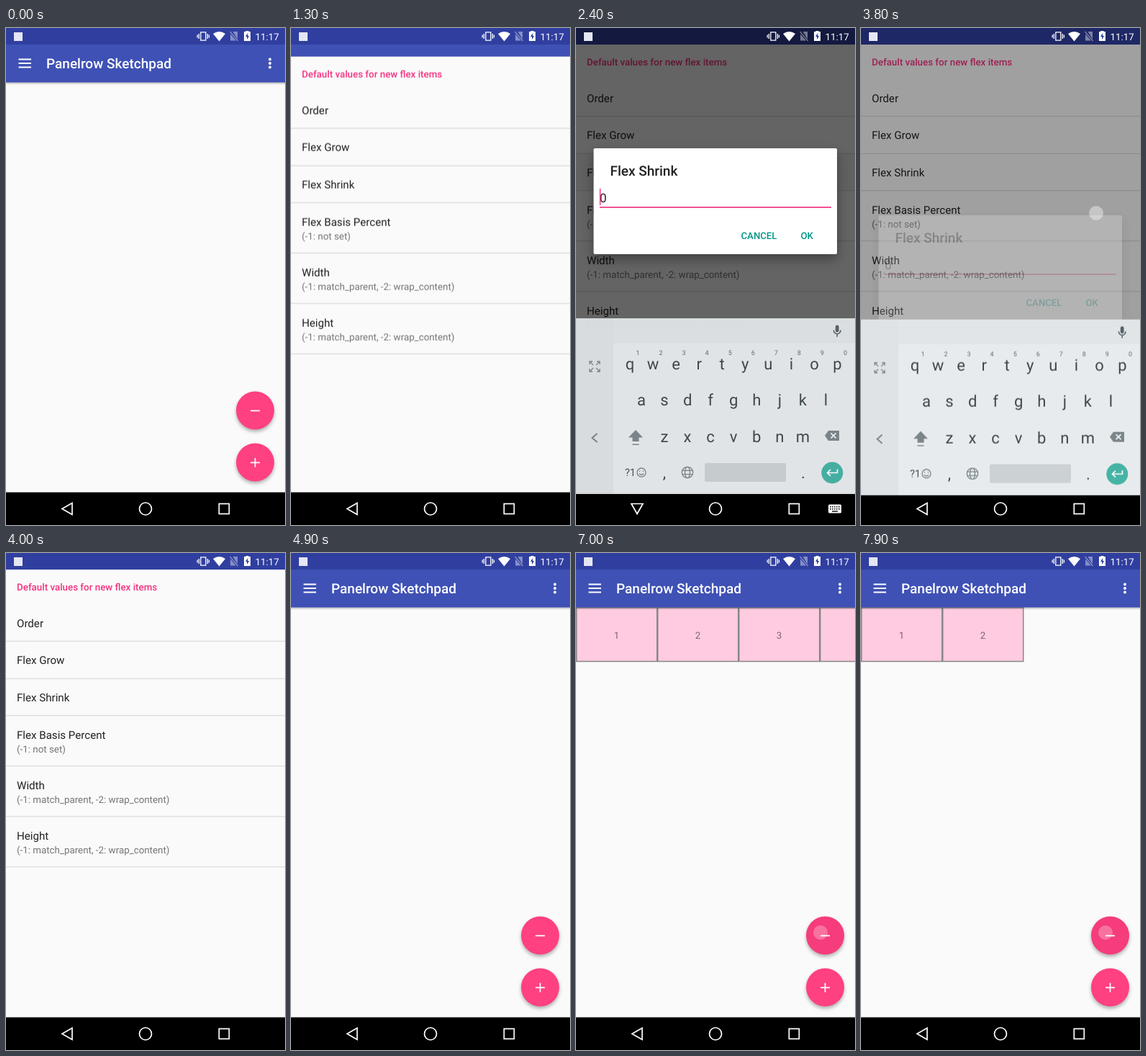
An HTML page that plays this animation: 388 px wide and 690 px high, repeating every 8000 ms.

```html
<!DOCTYPE html>
<html lang="en">
<head>
<meta charset="utf-8">
<title>Layout demo</title>
<style>
html, body { margin: 0; width: 100%; height: 100%; overflow: hidden; background: #000; }
svg { display: block; width: 388px; height: 690px; }
text { font-family: Roboto, "Noto Sans", sans-serif; font-size: 15.1px; fill: #212121; text-rendering: geometricPrecision; }
.small { font-size: 13.35px; fill: #757575; }
.header { font-size: 13.35px; font-weight: 500; fill: #f5317f; }
.title { font-size: 19px; font-weight: 500; }
.button { font-size: 13.2px; font-weight: 500; fill: #009688; }
.line { fill: none; stroke: #fff; stroke-width: 1.7; }
.glyph { fill: none; stroke: #7b868b; stroke-width: 1.6; }
.thick { stroke-width: 2; }
.thin { stroke-width: 1.3; }
.fab { fill: #ff4081; filter: drop-shadow(0 3px 2.5px rgba(0,0,0,.3)); }
.card { fill: #fff; filter: drop-shadow(0 7px 8px rgba(0,0,0,.35)); }
.key { font-size: 22px; fill: #3d474d; text-anchor: middle; }
.hint { font-size: 9px; fill: #5f6b71; text-anchor: middle; }
.item rect { fill: #fecbe0; stroke: #878787; stroke-width: 1.5; }
.item text { font-size: 13.2px; fill: #86616f; text-anchor: middle; }
</style>
</head>
<body>
<svg id="stage" viewBox="0 0 388 690">
  <defs>
    <linearGradient id="shade" x1="0" y1="0" x2="0" y2="1">
      <stop offset="0" stop-opacity=".28"/><stop offset="1" stop-opacity="0"/>
    </linearGradient>
  </defs>

  <rect width="388" height="645" fill="#fafafa"/>
  <rect width="388" height="23" fill="#303f9f"/>
  <g id="main">
    <g id="items"></g>
    <rect y="75" width="388" height="4" fill="url(#shade)"/>
    <rect y="23" width="388" height="52.5" fill="#3f51b5"/>
    <path class="line thick" d="M17.5 43.5h17.5M17.5 49h17.5M17.5 54.5h17.5"/>
    <text class="title" x="56" y="56" style="fill:#fff">Panelrow Sketchpad</text>
    <g fill="#fff">
      <circle cx="367" cy="43.5" r="2"/><circle cx="367" cy="49" r="2"/><circle cx="367" cy="54.5" r="2"/>
    </g>
    <circle class="fab" cx="346.5" cy="531" r="26.5"/>
    <circle class="fab" cx="346.5" cy="603" r="26.5"/>
    <circle id="minusPress" cx="346.5" cy="531" r="26.5" fill="#a02050"/>
    <circle id="plusPress" cx="346.5" cy="603" r="26.5" fill="#a02050"/>
    <path class="line" d="M340 531.3h13M340 603.3h13M346.5 596.8v13"/>
  </g>

  <g id="settings">
    <rect y="23" width="388" height="622" fill="#fafafa"/>
    <rect id="rowPress" y="175" width="388" height="50" fill="#f3f3f3"/>
    <text class="header" x="15" y="52">Default values for new flex items</text>
    <g id="rows"></g>
  </g>

  <rect id="dim" width="388" height="645"/>

  <g id="status">
    <rect x="11" y="6" width="12" height="12" fill="#e4e6f3"/>
    <path class="line thin" d="M270.8 5.8h7v11.4h-7zM268.3 8v7M280.3 8v7M266.2 9.5v4M282.4 9.5v4"/>
    <path d="M288 8Q296.5 1.8 305 8L296.5 18.5Z" fill="#fff"/>
    <g opacity=".42">
      <path class="line thin" d="M311.5 5l11 13"/>
      <path d="M315.5 5h6.5v10.5zM312 8.5l8 9h-8z" fill="#fff"/>
    </g>
    <path d="M333.5 5v-1h4v1h2.5v13h-9V5z" fill="#fff"/>
    <path d="M336.2 7l-3.2 5h2v4l3.2-5h-2z" fill="#303f9f"/>
    <text x="346.5" y="16.5" style="font-size:13.3px;fill:#fff">11:17</text>
  </g>

  <g id="dialog">
    <rect class="card" x="24.5" width="338.5" height="147" rx="2"/>
    <text class="title" x="47.5" y="37.5">Flex Shrink</text>
    <text x="33" y="74.5" style="font-size:17px">0</text>
    <rect x="33" y="81" width="322" height="1.8" fill="#f0408a"/>
    <rect id="cursor" x="32.8" y="56" width="1.6" height="23" fill="#f0408a"/>
    <text class="button" x="229.5" y="126">CANCEL</text>
    <text class="button" x="312.5" y="126">OK</text>
  </g>

  <rect y="644.6" width="388" height="46"/>

  <g id="keyboard">
    <rect y="403" width="388" height="244" fill="#e8ebed"/>
    <rect y="403" width="388" height="34.5" fill="#e1e5e7"/>
    <rect y="403" width="52" height="244" fill="#dfe3e6"/>
    <g id="keys"></g>
    <rect x="360.8" y="412.5" width="4.8" height="10" rx="2.4" fill="#566167"/>
    <path class="glyph" d="M358.4 419.5a4.8 5.2 0 0 0 9.6 0M363.2 424.7v4" style="stroke:#566167"/>
    <path d="M83 558l-10 10.5h5.5v5.5h9v-5.5h5.5zM78.5 577.5h9v1.5h-9z" fill="#7b868b"/>
    <path d="M351 559h15v14h-15l-5-7z" fill="#7b868b"/>
    <path class="line" d="M354.5 562.5l7 7m0-7l-7 7"/>
    <path class="glyph thin" d="M19 467v-4h4m-4 0l5 5M33 467v-4h-4m4 0l-5 5M19 473v4h4m-4 0l5-5M33 473v4h-4m4 0l-5-5"/>
    <path class="glyph thick" d="M29.5 563l-7 6 7 6"/>
    <text x="68" y="622" style="font-size:14.5px;fill:#465056">?1</text>
    <g class="glyph thin">
      <circle cx="91" cy="617" r="6"/><path d="M88 618.5q3 3.5 6 0M88.5 614.5v1.5M93.5 614.5v1.5"/>
      <circle cx="155" cy="617" r="7.7"/><ellipse cx="155" cy="617" rx="3.5" ry="7.7"/>
      <path d="M148 614.3h14M148 619.7h14"/>
    </g>
    <rect x="179" y="604" width="113" height="26" rx="2" fill="#ccd1d4"/>
    <circle cx="356.3" cy="617.5" r="15" fill="#45b3a5"/>
    <path class="line" d="M363.5 612.5v5h-14m4.5-4.5l-4.5 4.5 4.5 4.5"/>
  </g>

  <path id="back" class="line" d="M92 659.5v16l-14-8z"/>
  <g id="imeNav">
    <path class="line" d="M77 660.5h16l-8 14z"/>
    <rect x="351" y="661.5" width="18" height="12" rx="1.5" fill="#fff"/>
    <path d="M353 664.7h14M353 667.7h14" stroke="#000" stroke-width="1.5" stroke-dasharray="1.6 1.4"/>
    <path d="M356 671h8" stroke="#000" stroke-width="1.4"/>
  </g>
  <circle class="line" cx="194" cy="667.5" r="8.5"/>
  <rect class="line" x="296.3" y="660.5" width="14" height="14"/>

  <g id="rowTouch">
    <circle cx="197" cy="198" r="20" fill="#000" opacity=".08"/>
    <circle cx="197" cy="198" r="10.5" fill="#fff" fill-opacity=".15" stroke="#d2d2d6" stroke-width="1.2"/>
  </g>
  <g id="touches"></g>
</svg>
<script>
const LOOP = 8000, FPS = 10;
const byId = id => document.getElementById(id);

function add(parent, tag, attrs, label) {
  const el = document.createElementNS("http://www.w3.org/2000/svg", tag);
  for (const k in attrs) el.setAttribute(k, attrs[k]);
  if (label !== undefined) el.textContent = label;
  return parent.appendChild(el);
}

// Plays [ms, value] pairs on one property, ten poses a second.
function play(el, prop, steps) {
  const all = [[0, steps[0][1]], ...steps, [LOOP, steps[steps.length - 1][1]]];
  el.animate(all.map(([ms, v]) => ({ offset: ms / LOOP, [prop]: v })),
    { duration: LOOP, iterations: Infinity, easing: `steps(${LOOP / 1000 * FPS}, end)` });
}

const fade = (el, steps) => play(el, "opacity", steps);
const slide = (el, steps) => play(el, "transform", steps.map(([ms, y]) => [ms, `translateY(${y}px)`]));

// Opacity "on" inside the spans, "off" outside; edges sit between two poses.
function show(el, spans, on = 1, off = 0) {
  fade(el, spans.flatMap(([a, b]) => [[a - 50, off], [a - 50, on], [b - 50, on], [b - 50, off]]));
}

// Settings list
const sizes = "(-1: match_parent, -2: wrap_content)";
[["Order", 102.5, 122.5], ["Flex Grow", 154.3, 174.5], ["Flex Shrink", 206.3, 225.7],
 ["Flex Basis Percent", 258, 295.7, "(-1: not set)"],
 ["Width", 328, 365.7, sizes], ["Height", 398, 435.7, sizes]
].forEach(([name, y, end, note]) => {
  const rows = byId("rows");
  add(rows, "text", { x: 15, y }, name);
  if (note) add(rows, "text", { x: 15, y: y + 18.5, class: "small" }, note);
  add(rows, "rect", { y: end - .6, width: 388, height: 1.2, fill: "#dadada" });
});

// Keyboard letters
const keys = byId("keys");
[["qwertyuiop", 75, 473.5], ["asdfghjkl", 91, 523.5], ["zxcvbnm", 123, 574.5]].forEach(([row, x0, y]) =>
  [...row].forEach((c, i) => add(keys, "text", { x: x0 + 32.05 * i, y, class: "key" }, c)));
[..."1234567890"].forEach((c, i) => add(keys, "text", { x: 86 + 32.05 * i, y: 453.5, class: "hint" }, c));
add(keys, "text", { x: 123, y: 625, class: "key" }, ",");
add(keys, "text", { x: 316, y: 625, class: "key" }, ".");

// Flex items: [appears, disappears]
const END = LOOP + 50;
[[5200, END], [5600, END], [6000, 7900], [6300, 7500]].forEach((span, i) => {
  const g = add(byId("items"), "g", { class: "item" });
  add(g, "rect", { x: 113 * i + .7, y: 76, width: 112, height: 74.5 });
  add(g, "text", { x: 113 * i + 56.5, y: 118.5 }, i + 1);
  show(g, [span]);
});

// Finger dots and button presses
function touch(x, y, spans, alpha = .45) {
  show(add(byId("touches"), "circle", { cx: x, cy: y, r: 10, fill: "#fff" }), spans, alpha);
}
const plus = [5200, 5600, 6000, 6300, 6700].map(t => [t - 100, t + 100]);
const minus = [[7000, 7200], [7400, 7600], [7800, LOOP]];
touch(366, 50, [[700, 1000]]);
touch(327, 257, [[3600, 3900]], .4);
touch(85, 667, [[4500, 4700]]);
touch(342, 598, plus);
touch(340, 527, minus, .28);
show(byId("plusPress"), plus, .2);
show(byId("minusPress"), minus, .1);
show(byId("rowTouch"), [[2000, 2300]]);
show(byId("rowPress"), [[2000, 2600]]);

// Screens
const settings = byId("settings");
fade(settings, [[1100, 0], [1300, 1], [4600, 1], [4800, 0]]);
slide(settings, [[1100, 50], [1400, 0], [4600, 0], [4800, 50]]);

// Dialog and keyboard
fade(byId("dim"), [[2100, 0], [2200, .01], [2400, .6], [3700, .6], [3800, .36], [4000, 0]]);
fade(byId("dialog"), [[2100, 0], [2200, .19], [2300, .85], [2400, 1], [3700, 1], [3800, .2], [3900, 0]]);
slide(byId("dialog"), [[2300, 260], [2400, 167], [2500, 145], [2600, 140], [3700, 140], [3800, 260]]);
show(byId("cursor"), [[2300, 2800], [3300, 3700]]);
slide(byId("keyboard"), [[2200, 290], [2300, 60], [2400, 0], [3700, 0], [3800, 1.7], [3900, 110], [4000, 290]]);
fade(byId("keyboard"), [[2200, .9], [2400, .95], [2600, 1]]);
show(byId("imeNav"), [[2300, 3800]]);
show(byId("back"), [[2300, 3800]], 0, 1);
</script>
</body>
</html>
```
